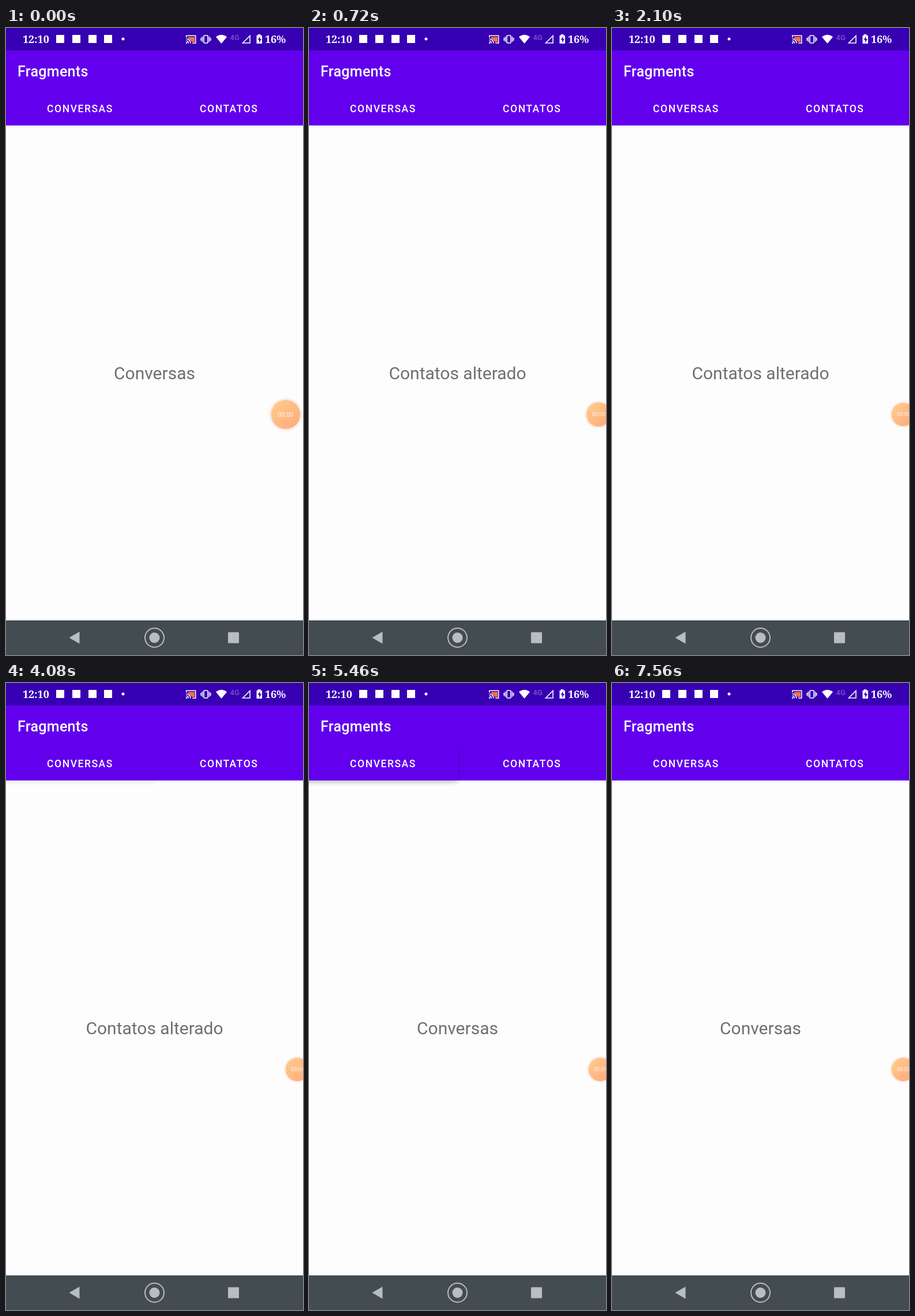
An HTML page for the animation above (8 s loop, 515x1087 px).

```html
<!DOCTYPE html>
<html lang="pt">
<head>
<meta charset="utf-8">
<title>Fragments</title>
<style>
  html, body { margin: 0; width: 100%; height: 100%; overflow: hidden; background: #fdfdfd; }
  svg { display: block; width: 100%; height: 100%; }
  text { font-family: Roboto, sans-serif; fill: #fff; }
  .status { font: 600 18px "Noto Serif", serif; }
  .title { font-size: 25px; font-weight: 500; letter-spacing: .0125em; }
  .tab { font-size: 17.5px; font-weight: 500; letter-spacing: .0893em; }
  .label { font-size: 30px; fill: #6f6f6f; text-anchor: middle; }
  .timer { font-size: 11px; text-anchor: middle; fill-opacity: .88; }
  #raised { filter: drop-shadow(0 3px 4px rgba(0, 0, 0, .26)); }
  .halo { filter: drop-shadow(0 0 3px rgba(255, 150, 110, .45)); }
</style>
</head>
<body>
<svg viewBox="0 0 515 1087" preserveAspectRatio="none">
  <defs>
    <linearGradient id="peach" x1="0" y1="0" x2="1" y2="1">
      <stop offset=".1" stop-color="#ffcb8a"/>
      <stop offset=".9" stop-color="#ffab7e"/>
    </linearGradient>
  </defs>

  <rect width="515" height="1087" fill="#fdfdfd"/>
  <rect width="515" height="169" fill="#6200ee"/>
  <rect id="raised" x="-10" y="112" width="268" height="57" fill="#6200ee"/>
  <rect width="515" height="39" fill="#3700b3"/>

  <!-- status bar -->
  <text class="status" x="29" y="26">12:10</text>
  <g fill="#fff">
    <rect x="87" y="12" width="14" height="14"/>
    <rect x="115" y="12" width="14" height="14"/>
    <rect x="143" y="12" width="14" height="14"/>
    <rect x="170" y="12" width="14" height="14"/>
    <circle cx="203" cy="19" r="2.5"/>
    <path d="M364 15.5Q373.500 8 383 15.500L373.500 27Z"/>
    <path d="M436.500 11h5v2h2.500v14h-9.500v-14h2z"/>
  </g>
  <path d="M440.500 14.500l-4 6h2.500v5l4-6.500h-2.500z" fill="#3700b3"/>
  <path d="M316 15.500h11v9h-4l-7-6.500z" fill="#f0733f"/>
  <g fill="none" stroke="#fff" stroke-width="1.6">
    <path d="M312.800 16.500v-3.200h15.900v13h-5.500M312.500 18.800a7.500 7.500 0 0 1 7.500 7.700M312.500 22.300a4 4 0 0 1 4 4.200"/>
    <rect x="343" y="13" width="7" height="13" rx="1"/>
    <path d="M340.500 15v9M352.500 15v9M338.300 17v5M354.700 17v5"/>
    <path d="M410.500 26L423 13.500V26Z"/>
  </g>
  <circle cx="313.200" cy="25.800" r="1.400" fill="#fff"/>
  <text x="388.500" y="21" font-size="13" font-weight="500" style="fill:#7955cc">4G</text>
  <text class="status" x="449" y="26">16%</text>

  <!-- app bar -->
  <text class="title" x="20" y="83.500">Fragments</text>
  <text class="tab" x="71" y="145.500">CONVERSAS</text>
  <text class="tab" x="336" y="145.500">CONTATOS</text>

  <text id="label" class="label" x="257.500" y="609">Conversas</text>

  <g id="bubble">
    <circle r="27.500" fill="#ff9c78" opacity=".1"/>
    <circle class="halo" r="25" fill="url(#peach)"/>
    <text id="timer" class="timer" y="4">00:00</text>
  </g>

  <!-- navigation bar -->
  <rect y="1027" width="515" height="60" fill="#434c50"/>
  <g fill="#b8bdbf">
    <path d="M109.500 1057L127.500 1046.500V1067.500Z"/>
    <circle cx="257.500" cy="1057" r="9"/>
    <circle cx="257.500" cy="1057" r="16.500" fill="none" stroke="#b8bdbf" stroke-width="2"/>
    <rect x="385" y="1047.500" width="19" height="19" rx="1"/>
  </g>
</svg>
<script>
  const LOOP = 8000;
  const byId = id => document.getElementById(id);
  const [raised, label, bubble, timer] = ['raised', 'label', 'bubble', 'timer'].map(byId);

  const labels = [[0, 'Conversas'], [320, 'Contatos alterado'], [5400, 'Conversas']];
  const timers = [[0, '00:00'], [2820, '00:01'], [5800, '00:02'], [7300, '00:03']];
  const dock = [[160, 0], [400, .6], [720, .85], [960, .95], [1380, 1]];
  const lift = [[4079, 0], [4080, .3], [4340, 1], [5460, 1], [5620, 0]];

  const held = (steps, t) => steps.filter(([at]) => at <= t).pop()[1];

  function tween(keys, t) {
    const next = keys.findIndex(([at]) => at > t);
    if (next === 0) return keys[0][1];
    if (next < 0) return keys[keys.length - 1][1];
    const [t0, v0] = keys[next - 1], [t1, v1] = keys[next];
    return v0 + (v1 - v0) * (t - t0) / (t1 - t0);
  }

  function setText(node, value) {
    if (node.textContent !== value) node.textContent = value;
  }

  function render(t) {
    const docked = tween(dock, t);
    bubble.setAttribute('transform', `translate(${485 + 20 * docked} 670) scale(${1 - .2 * docked})`);
    raised.style.opacity = tween(lift, t);
    setText(label, held(labels, t));
    setText(timer, held(timers, t));
  }

  const start = performance.now();
  function tick() {
    render((performance.now() - start) % LOOP);
    requestAnimationFrame(tick);
  }
  tick();
</script>
</body>
</html>
```
